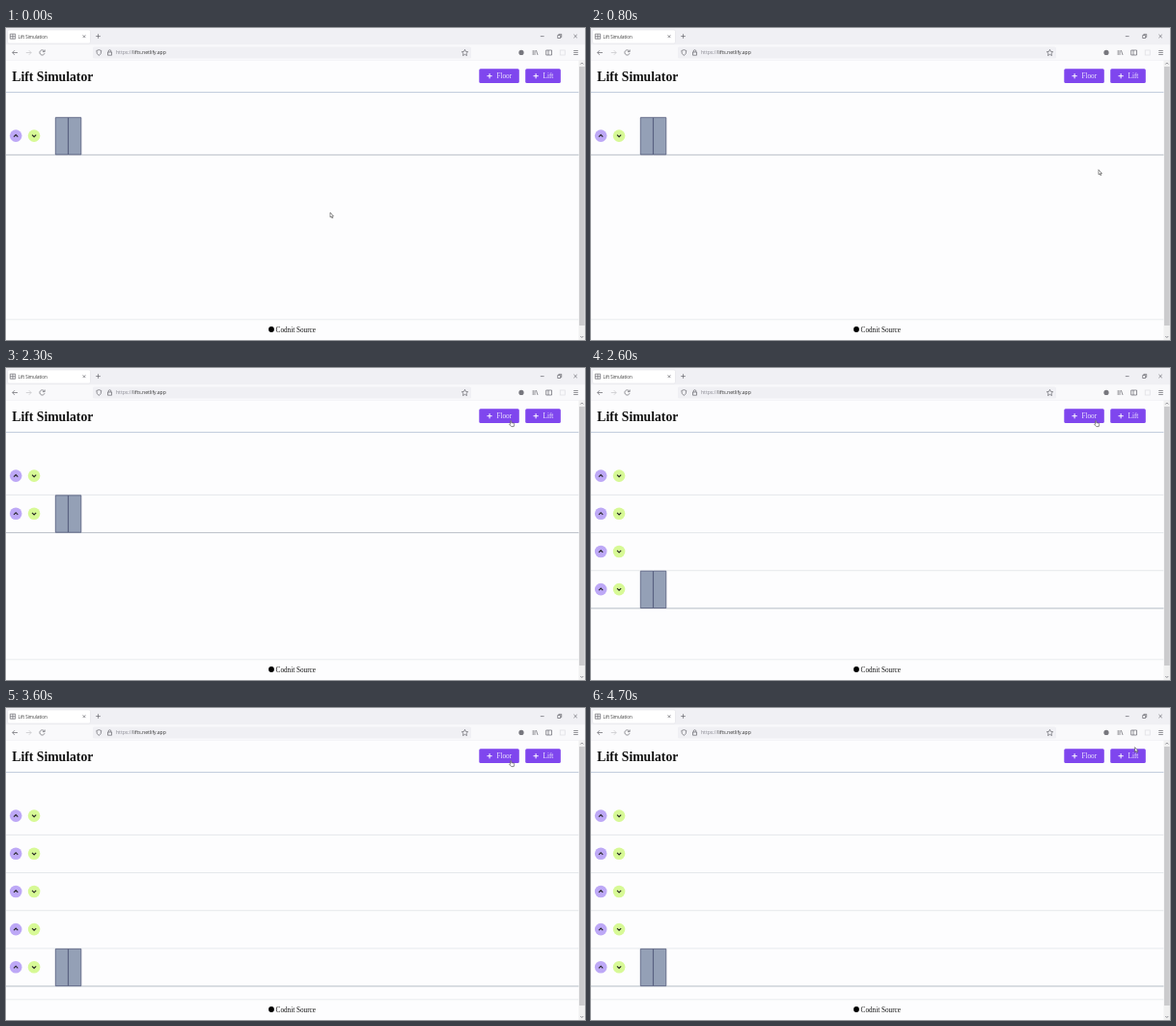
Recreate the animation shown at these times as an HTML page. Size 600x323 px, loop 4750 ms.

```html
<!DOCTYPE html>
<html lang="en">
<head>
<meta charset="utf-8">
<title>Lift Simulation</title>
<style>
  html, body { margin: 0; width: 100%; height: 100%; overflow: hidden; background: #fdfdfe; }
  svg { display: block; width: 600px; height: 323px; }
  text { font-family: "Liberation Serif", serif; font-size: 7.2px; fill: #111; }
  .ui text { font-family: "Open Sans", sans-serif; fill: #333; }
  .line { fill: none; stroke: #66666d; stroke-width: .7; }
  .faint { stroke: #c4c4c9; }
  .chevron { fill: none; stroke: #222; stroke-width: 1.1; }
  .plus { stroke: #fff; stroke-width: 1; }
  .button text { fill: #f1eafe; }
  .button rect { fill: #7f46ee; }
</style>
</head>
<body>
<svg viewBox="0 0 600 323">
  <defs>
    <g id="floor">
      <path d="M0 131.4H593.5" stroke="#e0e4e8" stroke-width=".8"/>
      <circle cx="10.2" cy="111.6" r="6.3" fill="#bda8f6"/>
      <circle cx="29.1" cy="111.6" r="6.3" fill="#d7f996"/>
      <path class="chevron" d="M8.1 112.6L10.2 110.5L12.3 112.6M27 110.6L29.1 112.7L31.2 110.6"/>
    </g>
  </defs>

  <!-- Browser window -->
  <g class="ui">
    <rect width="600" height="17.5" fill="#f0f0f4"/>
    <rect y="17.5" width="600" height="16" fill="#f9f9fb"/>
    <path d="M0 33.5H600" stroke="#ececf0" stroke-width=".5"/>
    <rect x="1.5" y="2" width="86" height="14" rx="1.5" fill="#fff" stroke="#dcdce2" stroke-width=".5"/>
    <rect x="90" y="19.5" width="392" height="12" rx="1.5" fill="#f0f0f4"/>
    <path class="line" d="M4.3 6.2H9.7V11.2H4.3ZM4.3 8.7H9.7M7 6.2V11.2"/>
    <text x="12.5" y="10.5" style="font-size:4.5px">Lift Simulation</text>
    <path class="line" d="M79.6 7.3L82.4 10.1M82.4 7.3L79.6 10.1M95.5 6.2V10.8M93.2 8.5H97.8"/>
    <path class="line" d="M553.8 8.6H557.6M571.7 7.5H574.6V10.5H571.7ZM572.8 7.4V6.4H575.7V9.4H574.7M588.4 6.8L591.8 10.2M591.8 6.8L588.4 10.2"/>
    <path class="line" d="M12 25.5H6.7M9 23.2L6.7 25.5L9 27.8"/>
    <path class="line faint" d="M20.8 25.5H26.1M23.8 23.2L26.1 25.5L23.8 27.8"/>
    <path class="line" d="M39.7 24A2.6 2.6 0 1 0 40 26.2M40.2 22.5V24.6H38"/>
    <path class="line" d="M96.3 22.6L98.8 23.5Q98.9 27 96.3 28.5Q93.7 27 93.8 23.5ZM105.5 25H109.5V28.2H105.5ZM106.2 25V24A1.3 1.3 0 0 1 108.8 24V25"/>
    <text x="114" y="27.4" style="font-size:5.07px"><tspan fill="#85858e">https://</tspan>lifts.netlify.app</text>
    <path class="line" d="M475.5 22.3L476.5 24.4L478.7 24.7L477.1 26.2L477.5 28.5L475.5 27.4L473.5 28.5L473.9 26.2L472.3 24.7L474.5 24.4Z"/>
    <circle cx="534" cy="25.4" r="2.6" fill="#77777e"/>
    <path class="line" d="M546.2 23V28M548 23V28M549.4 23L551 28M559.7 23H565.5V28H559.7ZM562 23V28M588.2 23.5H592.8M588.2 25.5H592.8M588.2 27.5H592.8"/>
    <rect class="line faint" x="574.2" y="23" width="5" height="5" opacity=".5"/>
    <rect x="593.5" y="33.5" width="6.5" height="290" fill="#f0f0f0"/>
    <rect x="594" y="40" width="5.7" height="268" fill="#cbcbcd"/>
    <path class="line" d="M595.3 37.5L596.8 36L598.3 37.5M595.3 319L596.8 320.5L598.3 319"/>
  </g>

  <!-- Page -->
  <text x="6.3" y="54.5" style="font-size:13.7px;font-weight:bold">Lift Simulator</text>
  <g class="button">
    <rect x="490.3" y="42.3" width="41.5" height="14.8" rx="1.5"/>
    <rect x="538.2" y="42.3" width="36.6" height="14.8" rx="1.5"/>
    <path class="plus" d="M498.5 49.7H503.7M501.1 47.1V52.3M546.5 49.7H551.7M549.1 47.1V52.3"/>
    <text x="508.5" y="52.2">Floor</text>
    <text x="556.5" y="52.2">Lift</text>
  </g>
  <path d="M0 66.6H593.5" stroke="#b9c6d6" stroke-width=".9"/>
  <g id="floors"></g>
  <g id="lift">
    <path d="M0 131.3H593.5" stroke="#b4bac4" stroke-width=".8"/>
    <path d="M51.3 92.7H64.4V131H51.3ZM64.6 92.7H77.8V131H64.6Z" fill="#94a0b6" stroke="#535b7c" stroke-width=".8"/>
  </g>
  <path d="M0 301.8H593.5" stroke="#e4e7eb" stroke-width=".8"/>
  <circle cx="275" cy="312" r="2.9"/>
  <text x="279.6" y="314.8">Codnit Source</text>

  <g id="cursor" fill="#fff" stroke="#444" stroke-width=".6" stroke-linejoin="round">
    <path id="arrow" d="M0 0V5L1.1 4.1L1.9 5.9L2.7 5.5L1.9 3.8H3.4Z"/>
    <path id="hand" d="M0 .5Q.5-.3 1 .5V2.4L3.7 3Q4.2 3.2 4 4.2L3.5 6.4H1L-1 4.2Q-1 3.4 0 4Z"/>
  </g>
</svg>
<script>
const LOOP = 4750, STEP = 50, FLOOR_HEIGHT = 39.17;
const floorTimes = [0, 2150, 2350, 2550, 2800];
const path = [ // time, x, y
  [0, 336, 191], [100, 336, 191], [750, 526, 146.7], [850, 526, 146.7],
  [1400, 520.8, 47.6], [1550, 520.8, 47.6], [1900, 522.7, 54.2],
  [4000, 522.7, 54.2], [4400, 563.6, 40.6], [LOOP, 563.6, 40.6]
];
const el = id => document.getElementById(id);

el("floors").innerHTML = floorTimes.map((_, i) =>
  `<use href="#floor" y="${i * FLOOR_HEIGHT}"/>`).join("");
const floors = [...el("floors").children];

function cursorAt(t) {
  const i = path.findIndex(p => p[0] > t);
  const [t0, x0, y0] = path[i - 1], [t1, x1, y1] = path[i];
  const u = (t - t0) / (t1 - t0), k = u * u * (3 - 2 * u);
  return [x0 + (x1 - x0) * k, y0 + (y1 - y0) * k];
}

function draw(now) {
  const t = Math.floor(now % LOOP / STEP) * STEP;
  const count = floorTimes.filter(time => time <= t).length;
  floors.forEach((floor, i) => floor.style.display = i < count ? "" : "none");
  el("lift").setAttribute("transform", `translate(0 ${(count - 1) * FLOOR_HEIGHT})`);

  const [x, y] = cursorAt(t);
  const overButton = y > 42.3 && y < 57.1 && (x > 490 && x < 532 || x > 538 && x < 575);
  el("cursor").setAttribute("transform", `translate(${x} ${y})`);
  el("arrow").style.display = overButton ? "none" : "";
  el("hand").style.display = overButton ? "" : "none";
}

const start = performance.now();
(function tick() {
  draw(performance.now() - start);
  requestAnimationFrame(tick);
})();
</script>
</body>
</html>
```
